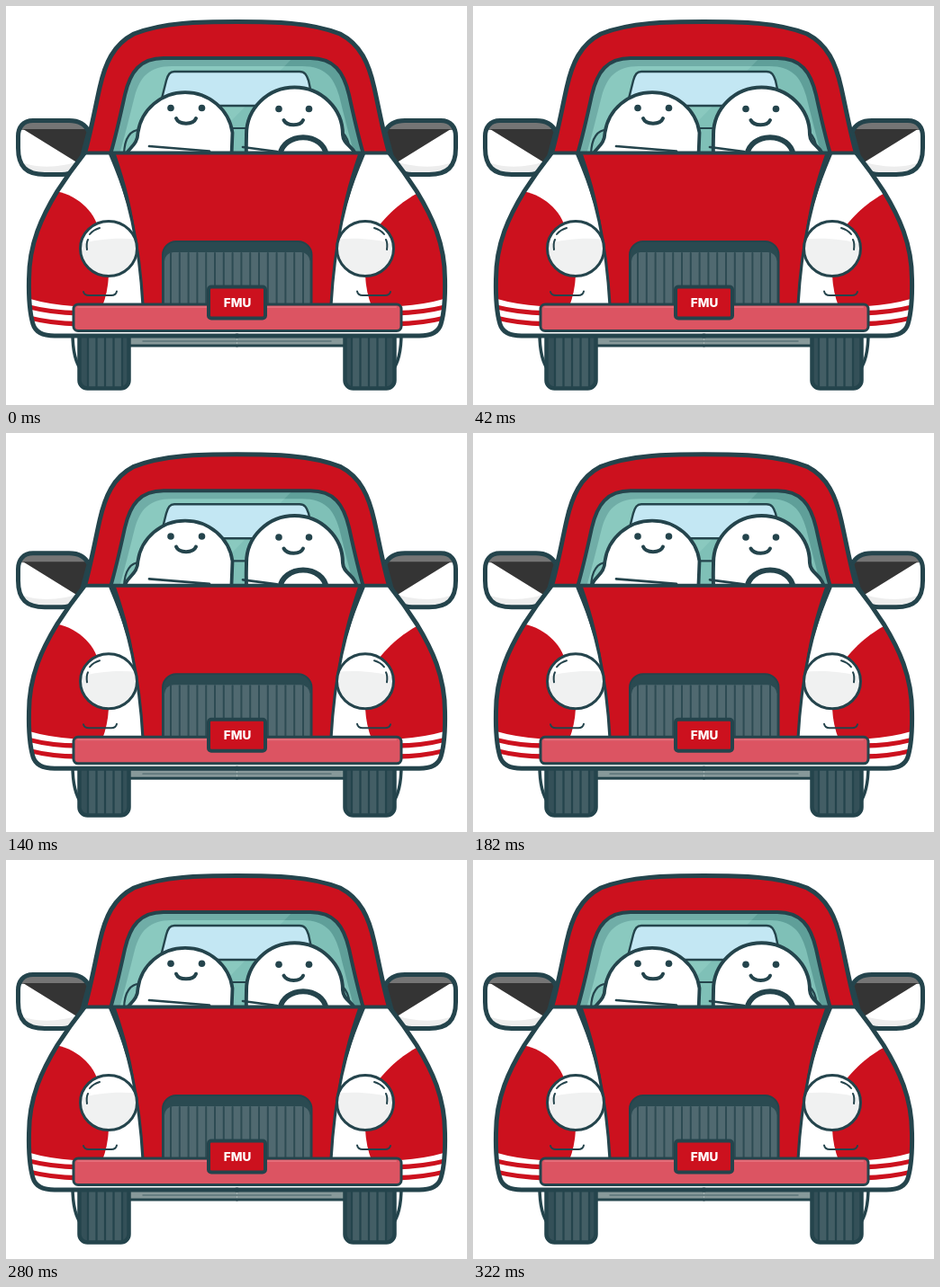
Write an HTML page with a canvas that moves like this. It is 512x444 px and loops after 350 ms.

```html
<!DOCTYPE html>
<html lang="en">
<head>
<meta charset="utf-8">
<title>Bouncing car</title>
<style>
  html, body { margin: 0; width: 100%; height: 100%; overflow: hidden; background: #fff; }
  canvas { display: block; }
</style>
</head>
<body>
<canvas id="stage" width="512" height="444"></canvas>
<script>
const ctx = document.getElementById('stage').getContext('2d');
const INK = '#24444c', RED = '#cc111e', WHITE = '#fff', MIRROR_AXIS = 513;
const STEP = 70;
const CAR_DROP = [0, 3.3, 6.3, 3.3, 0];
const RIDER_DROP = [0, 0.4, 1.5, 3, 1.7];

function paint(path, fill, stroke, width = 3) {
  const shape = typeof path === 'string' ? new Path2D(path) : path;
  if (fill) { ctx.fillStyle = fill; ctx.fill(shape); }
  if (stroke) { ctx.strokeStyle = stroke; ctx.lineWidth = width; ctx.stroke(shape); }
}

function box(x, y, w, h, radii) {
  const path = new Path2D();
  path.roundRect(x, y, w, h, radii);
  return path;
}

function oval(x, y, rx, ry = rx) {
  const path = new Path2D();
  path.ellipse(x, y, rx, ry, 0, 0, Math.PI * 2);
  return path;
}

function scoped(draw) {
  ctx.save();
  draw();
  ctx.restore();
}

function shifted(dy, draw) {
  scoped(() => { ctx.translate(0, dy); draw(); });
}

function clipped(path, draw) {
  scoped(() => {
    ctx.clip(typeof path === 'string' ? new Path2D(path) : path);
    draw();
  });
}

function mirrored(draw) {
  scoped(() => { ctx.translate(MIRROR_AXIS, 0); ctx.scale(-1, 1); draw(); });
}

function bothSides(draw) {
  draw();
  mirrored(draw);
}

const ROOF = 'M87 165C93 146 98 118 104 91C110 64 119 43 142 31C175 18 215 17.500 256.500 17.500' +
  'C298 17.500 338 18 371 31C394 43 403 64 409 91C415 118 420 146 426 165Z';
const WINDOW = 'M116 165C121 148 127 122 132 99C138 73 149 58 175 58H338' +
  'C364 58 375 73 381 99C386 122 392 148 397 165Z';
const INTERIOR = 'M126 165C131 148 138 120 143 100C149 79 159 67 184 67H329' +
  'C354 67 364 79 370 100C375 120 382 148 387 165Z';
const SIDE_EDGE = 'M87 164C76 178 66 192 57 206C40 234 25.500 264 25.500 304' +
  'C25 327 27 344 30 354C33 364 42 367 54 367H257';
const SIDE = SIDE_EDGE + 'V164Z';
const MIRROR = 'M92 140C88 131 80 127.500 70 127.500H30C19 127.500 13.500 135 13.500 145V158' +
  'C13.500 179 23 187.500 43 187.500H62C74 187.500 80 182 84 170Z';

function tyre() {
  const shape = box(81.5, 350, 55, 75.5, [0, 0, 9, 9]);
  paint(shape, '#435e65');
  paint('M82 360H90V424H82ZM129 360H136V424H129Z', '#345058');
  paint('M91 360V423M100.5 360V424M110 360V424M119.5 360V424M129 360V423', null, INK, 2.2);
  paint(shape, null, INK, 4.5);
}

function sideMirror() {
  paint(MIRROR, WHITE);
  clipped(MIRROR, () => {
    paint('M10 125H95V138H10Z', '#757575');
    paint('M19 137H95V184Z', '#343434');
    paint('M14 172C30 181 60 181 86 171V190H14Z', '#ededed');
  });
  paint(MIRROR, null, INK, 5);
}

function undercarriage() {
  paint('M74 364C74 383 77 397 84 406V364Z', WHITE, INK, 3.5);
  paint('M125 366H256.500V378H125Z', '#87999a');
  paint('M125 367.500H256.500M125 378H256.500', null, INK, 3);
  paint('M152 373H256.500', null, '#5c7479', 1.5);
}

function riders(drop) {
  shifted(drop, () => {
    paint('M130 180C130 156 146 160 146.500 141A53 52 0 0 1 251.500 141L250 180Z', WHITE, INK, 3.8);
    paint('M268 180C266 164 267 152 267 143A53.500 52.500 0 0 1 374 143C375 158 391 154 391 180Z',
      WHITE, INK, 4);
    for (const [x, y] of [[183, 113.5], [217.5, 113.5], [303, 114.5], [336.5, 114.5]])
      paint(oval(x, y, 3.8), INK);
    paint('M189 125C192 132.500 208 132.500 211 125', null, INK, 4);
    paint('M308.500 127C312 134 327 134 330 127', null, INK, 4);
  });
}

function cabin(carDrop, riderDrop) {
  paint(ROOF, RED, INK, 5);
  paint(WINDOW, '#5f9f99');
  clipped(WINDOW, () => {
    paint(INTERIOR, '#7fc0b7');
    paint('M125 58H318L214 165H100Z', 'rgba(190,235,224,.18)');
    paint('M187 73H326C332 73 334 77 336 83L342 111H171L178 83C180 76 182 73 187 73Z',
      '#c3e7f3', INK, 2.4);
    paint('M240 136H275', null, INK, 2.2);
    bothSides(() => paint('M150 138C139 137 131 146 131 167H150Z', '#83c3ba', INK, 2.2));
    shifted(-carDrop, () => riders(riderDrop));
    paint('M159 156L226 161.500M263 157L301 162', null, INK, 2.7);
    paint('M304 168C306 139 354 139 356 168', WHITE, INK, 6);
  });
  paint(WINDOW, null, INK, 4);
}

function fender(topCurve) {
  paint(SIDE, WHITE);
  clipped(SIDE, () => {
    paint(`M50 205${topCurve}L114 300Q113 319 107 334H75Q45 332 20 324V205Z`, RED);
    paint('M20 331Q48 339 80 339V344.500Q48 344 20 336ZM20 343Q48 351 80 351V356.500Q48 356 20 348Z', RED);
  });
  paint('M86 318Q87 322 92 322H117Q122 322 123 317.500', null, INK, 2);
}

function headlight() {
  const lamp = oval(114, 270, 31.5, 30.5);
  paint(lamp, WHITE);
  clipped(lamp, () => paint('M80 266C98 259 126 257 150 260V304H80Z', '#f0f1f1'));
  paint(lamp, null, INK, 3);
  paint('M90 271Q89 264 91 260M93 254Q97 249 104 247', null, INK, 2);
}

function hood() {
  paint('M117 164H396C377 212 365 262 361 333H152C148 262 136 212 117 164Z', RED);
  bothSides(() => {
    paint('M117 165C136 212 148 262 152 333', null, INK, 3.2);
    paint('M114 165C131 205 140 237 145 267C142 230 133 197 122 165Z', INK);
  });
  paint('M87 163.500H426', null, INK, 4);
}

function grille() {
  paint(box(174, 262, 165.5, 72, [15, 15, 0, 0]), '#2a4a51', INK, 2);
  paint(box(176, 274, 161.5, 59, [10, 10, 0, 0]), '#506970');
  for (let x = 183; x < 334; x += 9.8)
    paint(`M${x} 275V332`, null, '#2d4b53', 2);
}

function bumperAndPlate() {
  paint(box(75, 332, 364, 29.5, 5), '#dc5462', INK, 3);
  paint('M80 335H433', null, '#e36c78', 2);
  paint(box(225, 312.5, 63, 35, 3), RED, INK, 4);
  ctx.fillStyle = WHITE;
  ctx.font = '800 13.5px Inter, sans-serif';
  ctx.textAlign = 'center';
  ctx.fillText('FMU', 257, 334.5);
}

function render(phase) {
  const drop = CAR_DROP[phase];
  ctx.fillStyle = WHITE;
  ctx.fillRect(0, 0, 512, 444);
  ctx.lineCap = ctx.lineJoin = 'round';
  shifted(drop, () => bothSides(undercarriage));
  bothSides(tyre);
  shifted(drop, () => {
    bothSides(sideMirror);
    cabin(drop, RIDER_DROP[phase]);
    fender('C79 209 98 228 103 249');
    mirrored(() => fender('C64 212 86 226 102 249'));
    hood();
    bothSides(() => {
      paint(SIDE_EDGE, null, INK, 5);
      headlight();
    });
    grille();
    bumperAndPlate();
  });
}

function tick() {
  render(Math.floor(performance.now() / STEP) % CAR_DROP.length);
  requestAnimationFrame(tick);
}
tick();
</script>
</body>
</html>
```
